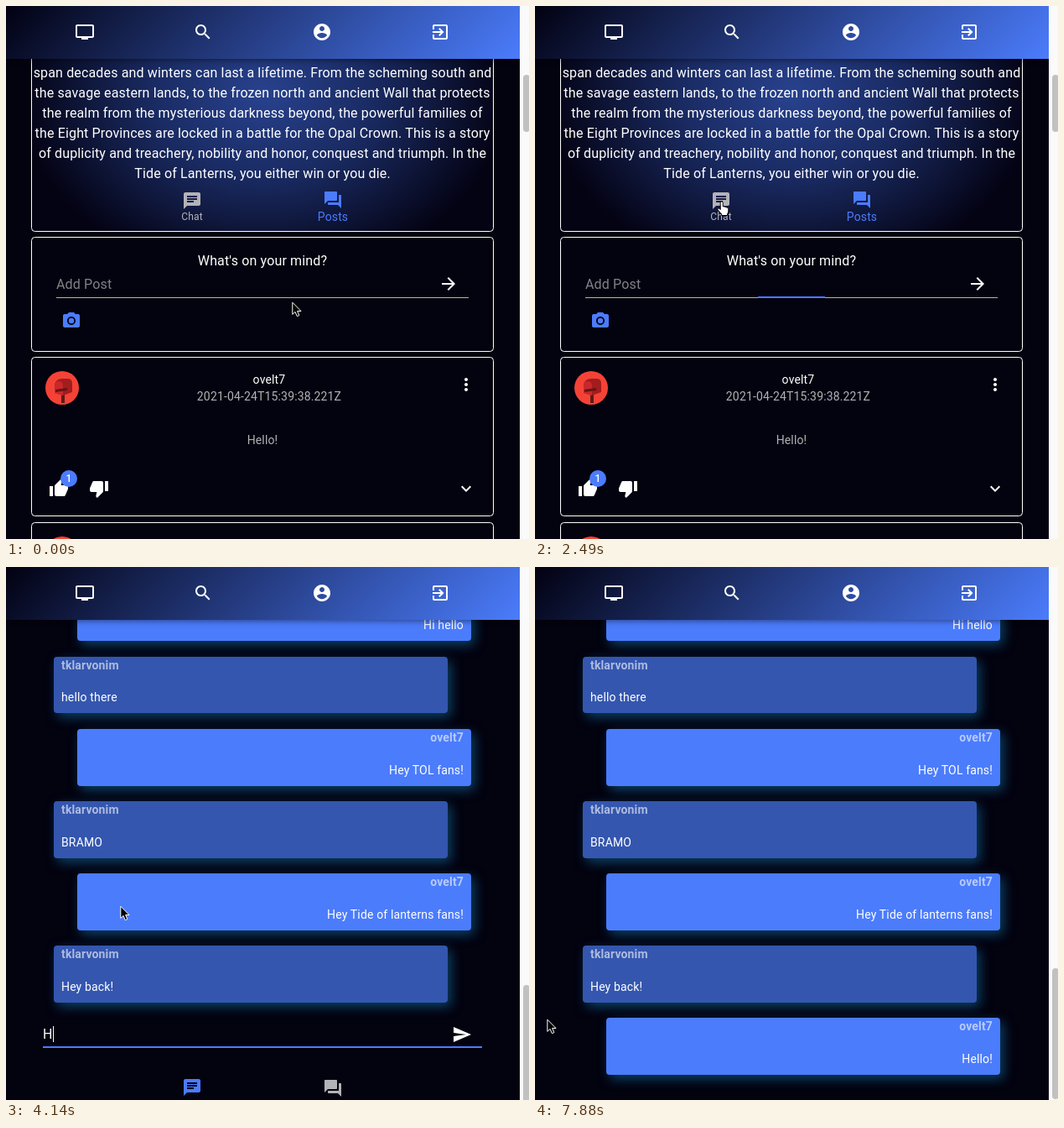
Write an HTML page that moves like this. It is 624 by 635 pixels and loops after 8 s.

```html
<!DOCTYPE html>
<html lang="en">
<head>
<meta charset="utf-8">
<title>Show page: posts and chat</title>
<style>
html, body { margin: 0; width: 100%; height: 100%; overflow: hidden; background: #03020f; }
body { position: relative; color: #fff; font: 16px/24px Roboto, sans-serif; letter-spacing: .15px; }
svg, section, header, i { position: absolute; display: block; }
svg { left: 0; top: 0; width: 624px; height: 635px; fill: #fff; overflow: hidden; }
text { white-space: pre; }
.mid { text-anchor: middle; }
.small { font-size: 14px; }
.soft { fill: #b3b3b7; }
.blue { fill: #4b7cfc; }
.card { fill: none; stroke: #fff; }

header { left: 0; top: 0; width: 613px; height: 63px;
  background: linear-gradient(135deg, #020111, #4b7cfc);
  box-shadow: 0 2px 4px -1px #0003, 0 4px 5px #0002, 0 1px 10px #0002; }
.track { left: 613px; top: 0; width: 11px; height: 635px; background: #fafafa; }
.thumb { left: 617px; top: 82px; width: 8px; height: 68px; border-radius: 4px; background: #c1c1c1; }

#chat { inset: 0; opacity: 0; }
.msg { position: absolute; box-sizing: border-box; width: 470px; height: 67.5px; padding: 0 9px;
  border-radius: 4px; font-size: 14px; line-height: 20px; top: calc(20.8px + 86.1px * var(--n));
  left: 57px; background: #3456af; box-shadow: 4px 5px 14px #1272a890; }
.mine { left: 85px; text-align: right; background: #4b7cfc; }
.msg b { display: block; margin-bottom: 18.5px; color: #fff9; }

.line { transform-box: fill-box; transform-origin: center; transform: scaleX(0); }
#typed { position: absolute; left: 44px; top: 547px; height: 19px; line-height: 19px; white-space: pre; }
#typed::after { content: ""; display: inline-block; height: 19px; vertical-align: top; border-right: 1px solid #fff; }

/* every change is a hard step on one shared 8 s clock */
#posts, #chat, #compose, #hint, #sent, #hand, #arrow, #postCaret, #cursor,
.line, .thumb, #typed::after { animation: 8s step-end infinite; }
#posts { animation-name: leave; }
#chat { animation-name: enter; }
#compose { animation-name: send; }
#sent { opacity: 0; animation-name: sent; }
#hint { animation-name: hint; }
#hand { opacity: 0; animation-name: hand; }
#arrow { animation-name: arrow; }
#postCaret { opacity: 0; animation-name: postCaret; }
#postLine { animation-name: postLine; }
#chatLine { animation-name: chatLine; }
.thumb { animation-name: scroll; }
#typed::after { animation-name: type; }
#cursor { transform: translate(341px, 352px); animation-name: move; }

@keyframes leave { 33% { opacity: 0 } }
@keyframes enter { 33% { opacity: 1 } }
@keyframes send { 74.125% { opacity: 0 } }
@keyframes sent { 74.125% { opacity: 1 } }
@keyframes hint { 51.75% { opacity: 0 } }
@keyframes hand { 16.5% { opacity: 1 } 33% { opacity: 0 } }
@keyframes arrow { 16.5% { opacity: 0 } 33% { opacity: 1 } }
@keyframes postCaret { 18.375% { opacity: 1 } 25.625% { opacity: 0 } }
@keyframes postLine {
  18.375% { transform: scaleX(.6) }
  20.125% { transform: scaleX(.97) }
  21.875% { transform: none }
  31.125% { transform: scaleX(.163) }
}
@keyframes chatLine { 33% { transform: scaleX(.895) } 34.875% { transform: none } }
@keyframes scroll {
  33% { top: 498px; height: 140px }
  74.125% { top: 478px; height: 156px }
}
@keyframes type {
  38.625% { border-color: transparent }
  44.25% { content: ""; border-color: #fff }
  51.75% { content: "H" }
  55.5% { content: "He" }
  57.375% { content: "Hell" }
  59.25% { content: "Hello" }
  62.875% { content: "Hello!"; border-color: #fff }
  70.375% { content: "Hello!"; border-color: transparent }
}
@keyframes move {
  3.75% { transform: translate(330px, 341px) }
  5.625% { transform: translate(300px, 311px) }
  7.5% { transform: translate(267px, 279px) }
  9.375% { transform: translate(243px, 255px) }
  11% { transform: translate(229px, 240px) }
  12.875% { transform: translate(222px, 233px) }
  14.625% { transform: translate(222px, 232px) }
  33% { transform: translate(221px, 231px) }
  38.625% { transform: translate(210px, 252px) }
  40.5% { transform: translate(177px, 320px) }
  42.375% { transform: translate(147px, 384px) }
  44.25% { transform: translate(136px, 403px) }
  77.875% { transform: translate(-50px, 403px) }
  98.5% { transform: translate(14px, 538px) }
}
</style>
</head>
<body>

<svg id="posts">
  <defs>
    <radialGradient id="glow" gradientUnits="userSpaceOnUse" cx="0" cy="0" r="290" gradientTransform="translate(306 105) scale(1 .75)">
      <stop offset="0" stop-color="#28428e"/>
      <stop offset=".45" stop-color="#1a2b63"/>
      <stop offset="1" stop-color="#040314"/>
    </radialGradient>
    <path id="chatIcon" d="M20 2H4c-1.1 0-1.99.9-1.99 2L2 22l4-4h14c1.1 0 2-.9 2-2V4c0-1.1-.9-2-2-2zM6 9h12v2H6V9zm8 5H6v-2h8v2zm4-6H6V6h12v2z"/>
    <path id="forumIcon" d="M21 6h-2v9H6v2c0 .55.45 1 1 1h11l4 4V7c0-.55-.45-1-1-1zm-4 6V3c0-.55-.45-1-1-1H3c-.55 0-1 .45-1 1v14l4-4h10c.55 0 1-.45 1-1z"/>
    <g id="avatar">
      <circle r="20" fill="#f44336"/>
      <path d="M-1 7h4v11h-4z" fill="#5c1a17"/>
      <path d="M-9-2C-9-8-5-11 0-11h7q5 0 5 6V5L1 9-9 6z" fill="#a31c1e"/>
      <path d="M-9-2q0-6 5-6t5 6V9l-10-3z" fill="#c8282a"/>
      <path d="M-8 2l14-2v3l-14 2z" fill="#651416"/>
    </g>
  </defs>

  <rect class="card" style="fill:url(#glow)" x="30.5" y="-40.5" width="551" height="309" rx="4"/>
  <g class="mid">
    <text x="312" y="60">This sprawling new drama is set in a world where summers</text>
    <text x="306" y="85">span decades and winters can last a lifetime. From the scheming south and</text>
    <text x="306" y="109">the savage eastern lands, to the frozen north and ancient Wall that protects</text>
    <text x="306" y="133">the realm from the mysterious darkness beyond, the powerful families of</text>
    <text x="306" y="157">the Eight Provinces are locked in a battle for the Opal Crown. This is a story</text>
    <text x="306" y="181">of duplicity and treachery, nobility and honor, conquest and triumph. In the</text>
    <text x="306" y="205">Tide of Lanterns, you either win or you die.</text>
    <text x="222" y="255" class="soft" font-size="12">Chat</text>
    <text x="390" y="256" class="small blue">Posts</text>
  </g>
  <use href="#chatIcon" x="210" y="220" class="soft"/>
  <use href="#forumIcon" x="378" y="219" class="blue"/>

  <rect class="card" x="30.5" y="275.5" width="551" height="136" rx="4"/>
  <text class="mid" x="306" y="309">What's on your mind?</text>
  <text x="60" y="337" fill="#828188">Add Post</text>
  <path id="postCaret" d="M60 322h1v19h-1z"/>
  <path d="M60 347h492v1H60z" class="soft"/>
  <path id="postLine" class="line blue" d="M60 346h492v2H60z"/>
  <path transform="translate(516 319)" d="M12 4l-1.41 1.41L16.17 11H4v2h12.17l-5.58 5.59L12 20l8-8z"/>
  <g class="blue" transform="translate(66 363)">
    <circle cx="12" cy="12" r="3.2"/>
    <path d="M9 2L7.17 4H4c-1.1 0-2 .9-2 2v12c0 1.1.9 2 2 2h16c1.1 0 2-.9 2-2V6c0-1.1-.9-2-2-2h-3.17L15 2H9zm3 15c-2.76 0-5-2.24-5-5s2.24-5 5-5 5 2.24 5 5-2.24 5-5 5z"/>
  </g>

  <rect class="card" x="30.5" y="418.5" width="551" height="189" rx="4"/>
  <use href="#avatar" x="67" y="455"/>
  <g class="mid small">
    <text x="314" y="450">ovelt7</text>
    <text x="314" y="470" class="soft">2021-04-24T15:39:38.221Z</text>
    <text x="306" y="522" class="soft">Hello!</text>
  </g>
  <path transform="translate(537 439)" d="M12 8c1.1 0 2-.9 2-2s-.9-2-2-2-2 .9-2 2 .9 2 2 2zm0 2c-1.1 0-2 .9-2 2s.9 2 2 2 2-.9 2-2-.9-2-2-2zm0 6c-1.1 0-2 .9-2 2s.9 2 2 2 2-.9 2-2-.9-2-2-2z"/>
  <path transform="translate(51 563)" d="M1 21h4V9H1v12zm22-11c0-1.1-.9-2-2-2h-6.31l.95-4.57.03-.32c0-.41-.17-.79-.44-1.06L14.17 1 7.59 7.59C7.22 7.95 7 8.45 7 9v10c0 1.1.9 2 2 2h9c.83 0 1.54-.5 1.84-1.22l3.02-7.05c.09-.23.14-.47.14-.73v-2z"/>
  <path transform="translate(99 563)" d="M15 3H6c-.83 0-1.54.5-1.84 1.22l-3.02 7.05c-.09.23-.14.47-.14.73v2c0 1.1.9 2 2 2h6.31l-.95 4.57-.03.32c0 .41.17.79.44 1.06L9.83 23l6.59-6.59c.36-.36.58-.86.58-1.41V5c0-1.1-.9-2-2-2zm4 0v12h4V3h-4z"/>
  <circle class="blue" cx="75" cy="563" r="10"/>
  <text class="mid" x="75" y="567" font-size="12" font-weight="500">1</text>
  <path transform="translate(537 563)" d="M16.59 8.59L12 13.17 7.41 8.59 6 10l6 6 6-6z"/>

  <rect class="card" x="30.5" y="615.5" width="551" height="189" rx="4"/>
  <use href="#avatar" x="67" y="652"/>
</svg>

<section id="chat">
  <div class="msg mine" style="--n:0"><b>ovelt7</b>Hi hello</div>
  <div class="msg" style="--n:1"><b>tklarvonim</b>hello there</div>
  <div class="msg mine" style="--n:2"><b>ovelt7</b>Hey TOL fans!</div>
  <div class="msg" style="--n:3"><b>tklarvonim</b>BRAMO</div>
  <div class="msg mine" style="--n:4"><b>ovelt7</b>Hey Tide of lanterns fans!</div>
  <div class="msg" style="--n:5"><b>tklarvonim</b>Hey back!</div>
  <div class="msg mine" style="--n:6" id="sent"><b>ovelt7</b>Hello!</div>
  <div id="compose">
    <svg>
      <text id="hint" x="44" y="562" fill="#828188">Write message...</text>
      <path d="M44 572h524v1H44z" class="soft"/>
      <path id="chatLine" class="line blue" d="M44 571h524v2H44z"/>
      <path transform="translate(532 545)" d="M2.01 21L23 12 2.01 3 2 10l15 2-15 2z"/>
      <use href="#chatIcon" x="210" y="608" class="blue"/>
      <use href="#forumIcon" x="378" y="609" class="soft"/>
    </svg>
    <div id="typed"></div>
  </div>
</section>

<header>
  <svg style="width:613px;height:63px">
    <path transform="translate(82 19)" d="M21 3H3c-1.1 0-2 .9-2 2v12c0 1.1.9 2 2 2h5v2h8v-2h5c1.1 0 1.99-.9 1.99-2L23 5c0-1.1-.9-2-2-2zm0 14H3V5h18v12z"/>
    <path transform="translate(223 19)" d="M15.5 14h-.79l-.28-.27C15.41 12.59 16 11.11 16 9.5 16 5.91 13.09 3 9.5 3S3 5.91 3 9.5 5.91 16 9.5 16c1.61 0 3.09-.59 4.23-1.57l.27.28v.79l5 4.99L20.49 19l-4.99-5zm-6 0C7.01 14 5 11.99 5 9.5S7.01 5 9.5 5 14 7.01 14 9.5 11.99 14 9.5 14z"/>
    <path transform="translate(365 19)" d="M12 2C6.48 2 2 6.48 2 12s4.48 10 10 10 10-4.48 10-10S17.52 2 12 2zm0 3c1.66 0 3 1.34 3 3s-1.34 3-3 3-3-1.34-3-3 1.34-3 3-3zm0 14.2c-2.5 0-4.71-1.28-6-3.22.03-1.99 4-3.08 6-3.08 1.99 0 5.97 1.09 6 3.08-1.29 1.94-3.5 3.22-6 3.22z"/>
    <path transform="translate(506 19)" d="M10.09 15.59L11.5 17l5-5-5-5-1.41 1.41L12.67 11H3v2h9.67l-2.58 2.59zM19 3H5c-1.11 0-2 .9-2 2v4h2V5h14v14H5v-4H3v4c0 1.1.89 2 2 2h14c1.1 0 2-.9 2-2V5c0-1.1-.9-2-2-2z"/>
  </svg>
</header>
<i class="track"></i>
<i class="thumb"></i>

<svg>
  <g id="cursor">
    <path id="arrow" d="M.8 1.2V15.4l3.2-3 2.3 5.3 2.5-1.1-2.2-5.1H11z" fill="#000" stroke="#fff"/>
    <path id="hand" transform="translate(-5 0)" d="M4.2 2.4a1.5 1.5 0 0 1 3 0v4.4l1 .1a1.4 1.4 0 0 1 1.6.6 1.5 1.5 0 0 1 2 .8 1.4 1.4 0 0 1 2 1.4v3.2c0 1-1 2-1.2 3v1.6h-7v-1.4C4.6 14.5 2 12.2 1 10.4c-.6-1.2.8-2 1.8-1.2l1.4 1.4z" stroke="#000"/>
  </g>
</svg>
</body>
</html>
```
